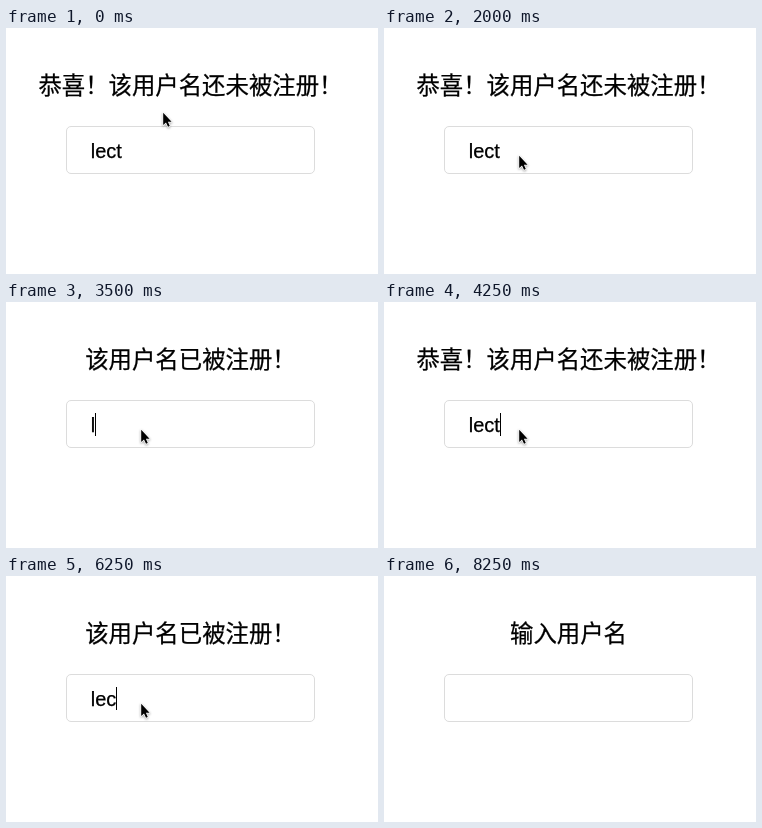
Write an HTML page that moves like this. It is 372x246 px and loops after 8.5 s.

```html
<!DOCTYPE html>
<html lang="zh-CN">
<head>
<meta charset="utf-8">
<title>输入用户名</title>
<style>
  html, body { margin: 0; width: 100%; height: 100%; overflow: hidden; background: #fff; }
  svg { display: block; }
  text { stroke: #000; stroke-width: .25; }
  #title { font: 23.4px "Noto Sans CJK SC", "Noto Sans CJK", sans-serif; }
  #name { font: 20px "Liberation Sans", Arial, sans-serif; }
  #pointer {
    stroke: #fff; stroke-width: 1.4; stroke-linejoin: round; paint-order: stroke;
    filter: drop-shadow(0 1px 1px rgba(0, 0, 0, .35));
  }
</style>
</head>
<body>
<svg width="372" height="246" viewBox="0 0 372 246">
  <text id="title" y="66"></text>
  <rect x="60.5" y="98.5" width="248" height="47" rx="4.5" fill="#fff" stroke="#dcdcdc"/>
  <text id="name" x="84.7" y="130"></text>
  <rect id="caret" y="111" width="1" height="23"/>
  <path id="pointer" d="M.2 .8V13L3 10.4L5 14.8L6.8 14L4.9 9.7H8.6Z"/>
</svg>
<script>
const LOOP = 8500;
const STEP = 250;
const BLINK = 500;
const USER = 'lect';
const CENTER = 184.5;
const SIZE = 23.4;
const TEXT_LEFT = 85;
const POINTER_GONE = 7500;

// The pointer takes one point per step, then rests on the last.
const PATH = [[157, 84], [122, 92], [118, 110], [121, 121], [122, 123], [135, 127]];

// Each run moves the letter count evenly over a number of steps.
const RUNS = [
  { at: 1500, from: 4, to: 4, steps: 0 },
  { at: 2500, from: 2, to: 0, steps: 2 },
  { at: 3500, from: 1, to: 4, steps: 3 },
  { at: 6250, from: 3, to: 0, steps: 2 }
];

const el = id => document.getElementById(id);
const title = el('title'), name = el('name'), caret = el('caret'), pointer = el('pointer');

const show = (node, on) => node.setAttribute('visibility', on ? 'visible' : 'hidden');

function typing(t) {
  const run = RUNS.findLast(r => r.at <= t);
  if (!run) return { count: USER.length, caretOn: false };
  const { at, from, to, steps } = run;
  const done = Math.min(Math.floor((t - at) / STEP), steps);
  const idle = t - at - done * STEP;
  return {
    count: Math.floor(from + (to - from) * done / (steps || 1)),
    caretOn: Math.floor(idle / BLINK) % 2 === 0
  };
}

function message(count) {
  if (!count) return '输入用户名';
  return count < USER.length ? '该用户名已被注册！' : '恭喜！该用户名还未被注册！';
}

function draw(t) {
  const { count, caretOn } = typing(t);
  const text = message(count);
  title.textContent = text;
  title.setAttribute('x', CENTER - text.length * SIZE / 2);
  name.textContent = USER.slice(0, count);
  caret.setAttribute('x', TEXT_LEFT + Math.floor(name.getComputedTextLength()));
  show(caret, caretOn);

  const [x, y] = PATH[Math.min(Math.floor(t / STEP), PATH.length - 1)];
  pointer.setAttribute('transform', `translate(${x} ${y})`);
  show(pointer, t < POINTER_GONE);
}

const start = performance.now();
function tick() {
  draw((performance.now() - start) % LOOP);
  requestAnimationFrame(tick);
}
tick();
</script>
</body>
</html>
```
